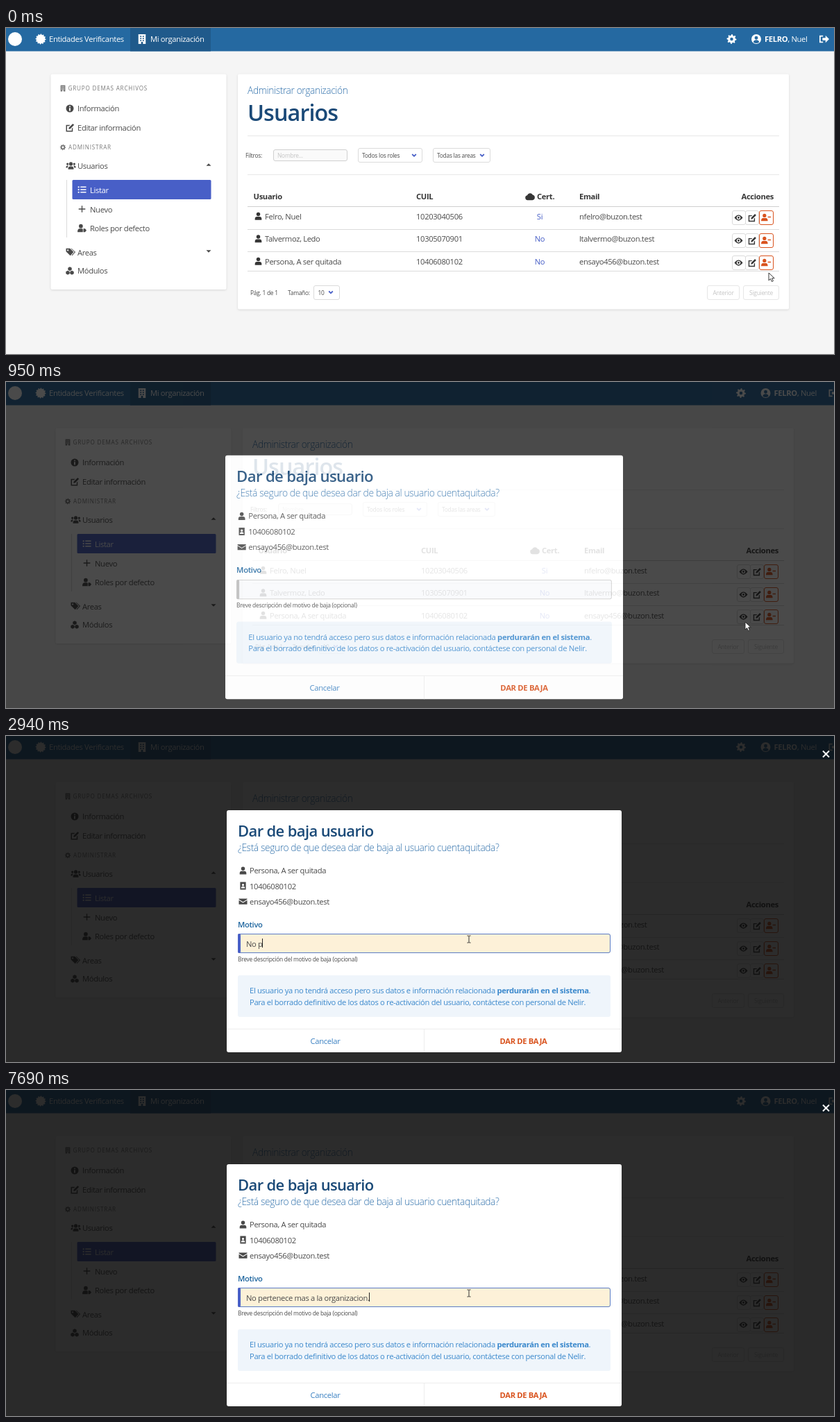
Animation, 1193 px wide and 470 px high, one loop 8000 ms. Source, as an HTML page:

```html
<!DOCTYPE html>
<html lang="es">
<head>
<meta charset="utf-8">
<title>Usuarios</title>
<style>
html, body { margin: 0; width: 100%; height: 100%; overflow: hidden; background: #f5f5f5; }
svg { display: block; width: 1193px; height: 470px; }
text { font: 11.2px "Open Sans", "Noto Sans", sans-serif; letter-spacing: -.029em; }
.small { font-size: 8.4px; }
.bold { font-weight: 700; }
.semi { font-weight: 600; }
.light { font-weight: 300; font-size: 13.8px; }
.label { font-size: 8.1px; letter-spacing: .1em; }
.mid { text-anchor: middle; }
.end { text-anchor: end; }
.card { filter: drop-shadow(0 1px 1.5px rgba(10,10,10,.12)); }
</style>
</head>
<body>
<svg id="stage" viewBox="0 0 1193 470"></svg>
<script>
const INK = '#4a4a4a', DARK = '#363636', BLUE = '#485fc7', NAVY = '#1b4a78', SKY = '#2f70ab', ORANGE = '#d9531e', PALE = '#c4c4c4';

// Icons live in a 16 x 16 box
const disc = (x, y, r) => `M${x - r} ${y}a${r} ${r} 0 1 0 ${2 * r} 0a${r} ${r} 0 1 0 ${-2 * r} 0z`;
const cog = (teeth, r) => 'M' + Array.from({ length: teeth * 4 }, (_, i) => {
  const a = i * Math.PI / teeth / 2, d = i % 4 < 2 ? 8 : r;
  return (8 + d * Math.cos(a)).toFixed(2) + ' ' + (8 + d * Math.sin(a)).toFixed(2);
}).join('L') + 'z';
const hex = (x, y) => `M${x} ${y - 4}l3.6 2v4l-3.6 2l-3.6-2v-4z`;
const icons = {
  user: disc(8, 4, 4) + 'M1 16v-2.5a4.5 4.5 0 0 1 4.5-4.5h5a4.5 4.5 0 0 1 4.5 4.5v2.5z',
  users: disc(8, 5, 3) + disc(2.5, 5.2, 1.9) + disc(13.5, 5.2, 1.9) + 'M3.5 14v-1.5q0-3.5 3.5-3.5h2q3.5 0 3.5 3.5v1.5zM0 11.5q-.5-3.5 2.5-3.5h1.5q-1.5 1.2-1.5 3.5zM16 11.5q.5-3.5-2.5-3.5h-1.5q1.5 1.2 1.5 3.5z',
  remove: disc(5.5, 5, 3) + 'M0 14q0-5 3.5-5h4q3.5 0 3.5 5zM11 6.5h5v1.7h-5z',
  role: disc(6, 4.5, 3.5) + 'M0 15q0-6 4-6h4q1 0 1.5 1v5zM10.5 9h3l2.5 3-2.5 3h-3z',
  account: disc(8, 8, 8) + disc(8, 6, 2.8) + 'M3.2 13q.8-3.5 4.8-3.5t4.8 3.5q-4.8 3.6-9.6 0z',
  building: 'M2 0h12v16h-4.5v-3.5h-3v3.5h-4.5z' + [2.5, 6, 9.5].map(y => `M5 ${y}v2h2v-2zM9 ${y}v2h2v-2z`).join(''),
  info: disc(8, 8, 8) + 'M6.8 3h2.4v2.3h-2.4zM6.5 7h2.8v6h-2.8z',
  edit: 'M0 3h8l-2 2h-4v9h9v-4l2-2v8h-13zM5 11l.5-3L13 .5l2.5 2.5L8 10.5z',
  gear: cog(8, 6) + disc(8, 8, 2.6),
  seal: cog(12, 6.6),
  list: [3, 8, 13].map(y => disc(1.5, y, 1.5) + `M5 ${y - 1}h11v2h-11z`).join(''),
  plus: 'M7 1h2v6h6v2h-6v6h-2v-6h-6v-2h6z',
  tags: 'M0 2h6.5l6 6-5.5 6-7-7zM8 2h1l6.5 6-5.5 6-.8-.8L14 8z' + disc(3, 5, 1.2),
  cubes: hex(8, 4.2) + hex(4, 11.5) + hex(12, 11.5),
  cloud: 'M4 14a4 4 0 0 1-.6-7.9a5 5 0 0 1 9-1.1a4.6 4.6 0 0 1-.4 9z',
  eye: 'M0 8q8-11 16 0q-8 11-16 0z' + disc(8, 8, 3.6) + disc(8, 8, 1.9),
  badge: 'M2 0h12v16h-12z' + disc(8, 6, 2.3) + 'M4 13q0-4 4-4t4 4z',
  mail: 'M0 2.5h16v1.5l-8 5-8-5zM0 5.5l8 5 8-5v8h-16z',
  exit: 'M0 2h6v2h-4v8h4v2h-6zM5 6h5v-4l6 6-6 6v-4h-5z',
  up: 'M0 12l8-8 8 8z',
  down: 'M0 4h16l-8 8z'
};

// Icon centred on x, y
const icon = (name, x, y, size = 12, fill = '') =>
  `<path d="${icons[name]}" fill-rule="evenodd" ${fill && `fill="${fill}"`} transform="translate(${x - size / 2} ${y - size / 2}) scale(${size / 16})"/>`;
const text = (x, y, str, cls = '', fill = '') =>
  `<text x="${x}" y="${y}" class="${cls}" ${fill && `fill="${fill}"`}>${str}</text>`;
const box = (x, y, w, h, fill, more = '') => `<rect x="${x}" y="${y}" width="${w}" height="${h}" fill="${fill}" ${more}/>`;
const frame = (x, y, w, h, stroke = '#dbdbdb', fill = '#fff') => box(x + .5, y + .5, w - 1, h - 1, fill, `stroke="${stroke}" rx="2.5"`);
const chevron = (x, y) => `<path d="M${x - 2.8} ${y - 1.5}l2.8 2.8 2.8-2.8" fill="none" stroke="${BLUE}" stroke-width="1.8"/>`;
const rule = (y, color) => box(348, y, 766, 1, color);

const person = 'Persona, A ser quitada', personId = '10406080102', personMail = 'ensayo456@buzon.test';

const header = box(0, 0, 1193, 33.5, '#2569a1') + box(179, 0, 116, 33.5, '#205a8b') +
  `<g fill="#fff"><circle cx="13" cy="16" r="10"/>` +
  icon('seal', 50, 16, 15) + text(62, 20, 'Entidades Verificantes') +
  icon('building', 196, 16, 14) + text(208, 20, 'Mi organización') +
  `<g id="account">` + icon('gear', 1045.5, 16, 14) + icon('account', 1081, 16, 14) +
  text(1093, 20, '<tspan class="bold">FELRO</tspan>, Nuel') + icon('exit', 1179, 16, 14) + '</g></g>';

const sidebar = box(64.5, 66.5, 253, 310.5, '#fff', 'class="card" rx="2"') +
  icon('building', 82, 87, 9, '#7a7a7a') + text(89.5, 90, 'GRUPO DEMAS ARCHIVOS', 'label', '#7a7a7a') +
  icon('info', 92, 116, 11) + text(103, 120, 'Información') +
  icon('edit', 92.5, 143.5) + text(103, 147.5, 'Editar información') +
  icon('gear', 82, 172, 8.5, '#7a7a7a') + text(90, 175, 'ADMINISTRAR', 'label', '#7a7a7a') +
  icon('users', 93.5, 198.5, 14) + text(103, 203, 'Usuarios') + icon('up', 292, 197, 7) +
  box(87, 219, 1, 83, '#dbdbdb') + box(95.5, 219, 200, 28, BLUE, 'rx="1.5"') +
  icon('list', 109.5, 233, 12, '#fff') + text(121, 237.5, 'Listar', '', '#fff') +
  icon('plus', 109.5, 261, 11) + text(121, 265.5, 'Nuevo') +
  icon('role', 109.5, 288.5, 13) + text(121, 292.5, 'Roles por defecto') +
  icon('tags', 93.5, 323, 14) + text(103, 327.5, 'Areas') + icon('down', 292, 322, 7) +
  icon('cubes', 92, 350) + text(103, 354, 'Módulos');

const row = ([name, id, cert, mail], i) => {
  const y = 273.3 + i * 32.5, base = y + 2.5, mid = Math.round(y), top = mid - 10;
  return icon('user', 363.5, y - 2, 11, DARK) + text(373, base, name) + text(591, base, id) +
    text(769, base, cert, 'mid', BLUE) + text(826, base, mail) +
    frame(1046, top, 20, 21) + frame(1065, top, 20, 21) + frame(1085, top, 21, 21, ORANGE) +
    icon('eye', 1055.5, mid + .5, 12, DARK) + icon('edit', 1075.5, mid + .5, 11.5, DARK) + icon('remove', 1095, mid, 14, ORANGE) +
    rule(i < 2 ? Math.round(y + 16.5) : 350, '#dbdbdb');
};
const main = box(334, 66.5, 794, 339, '#fff', 'class="card" rx="2"') +
  text(348, 95, 'Administrar organización', 'light', SKY) +
  `<text x="348" y="133.5" class="semi" style="font-size:32.4px" fill="${NAVY}">Usuarios</text>` +
  rule(155, '#e8e8e8') + rule(211, '#e8e8e8') +
  text(345, 187, 'Filtros:', 'small') +
  frame(385, 175, 107, 17, '#d0d0d0', '#fafafa') + text(391, 187, 'Nombre...', 'small', PALE) +
  frame(507, 173, 93, 21) + text(513, 187, 'Todos los roles', 'small') + chevron(588, 183.5) +
  frame(615, 173, 83, 21) + text(621, 187, 'Todas las areas', 'small') + chevron(686, 183.5) +
  `<g fill="${DARK}">` + text(356.5, 247, 'Usuario', 'bold') + text(591, 247, 'CUIL', 'bold') +
  icon('cloud', 755, 243, 14) + text(765, 247, 'Cert.', 'bold') + text(826, 247, 'Email', 'bold') +
  text(1106, 247, 'Acciones', 'bold end') + '</g>' + rule(257, '#cfcfcf') +
  [['Felro, Nuel', '10203040506', 'Si', 'nfelro@buzon.test'],
   ['Talvermoz, Ledo', '10305070901', 'No', 'ltalvermo@buzon.test'],
   [person, personId, 'No', personMail]].map(row).join('') +
  text(352, 384.5, 'Pág. 1 de 1', 'small') + text(406, 384.5, 'Tamaño:', 'small') +
  frame(443, 371, 38, 21) + text(449.5, 384.5, '10', 'small') + chevron(468, 381) +
  frame(1010, 371, 47, 21, '#e6e6e6') + text(1033.5, 384.5, 'Anterior', 'small mid', PALE) +
  frame(1062, 371, 52, 21, '#e6e6e6') + text(1088, 384.5, 'Siguiente', 'small mid', PALE);

const modal = box(318, 107, 569, 349, '#fff', 'rx="3"') +
  `<text x="334" y="145" class="semi" style="font-size:22px" fill="${NAVY}">Dar de baja usuario</text>` +
  text(334, 165.5, '¿Está seguro de que desea dar de baja al usuario cuentaquitada?', 'light', SKY) +
  icon('user', 341.5, 194, 11) + text(351, 198, person) +
  icon('badge', 341.5, 216, 11) + text(351, 220.5, personId) +
  icon('mail', 341.5, 238.5) + text(351, 242.5, personMail) +
  text(334, 275.5, 'Motivo', 'semi', '#1f669f') +
  frame(334, 285, 537, 28, '#cfcfcf', '#f9fafc') + box(334, 285, 4, 28, '#bdbdbd', 'rx="2"') +
  `<g id="focus">` + frame(334, 285, 537, 28, '#5a7cc4', '#fdf1d8') + box(334, 285, 4, 28, BLUE, 'rx="2"') + '</g>' +
  '<text id="typed" x="346" y="303.5"></text>' + box(0, 292, 1, 13, '#222', 'id="caret"') +
  text(334, 325, 'Breve descripción del motivo de baja (opcional)', 'small') +
  box(334, 345, 537, 60, '#eff5fb', 'rx="3"') + `<g fill="#3a88cc">` +
  text(351, 371, 'El usuario ya no tendrá acceso pero sus datos e información relacionada <tspan class="bold">perdurarán en el sistema</tspan>.') +
  text(351, 387.5, 'Para el borrado definitivo de los datos o re-activación del usuario, contáctese con personal de Nelir.') + '</g>' +
  box(318, 422, 569, 1, '#ededed') + box(602, 422, 1, 34, '#ededed') +
  text(460, 444, 'Cancelar', 'mid', '#3a80c2') + text(745.5, 444, 'DAR DE BAJA', 'bold mid', ORANGE);

const $ = id => document.getElementById(id);
$('stage').innerHTML = box(0, 0, 1193, 470, '#f5f5f5') + header +
  `<g id="page" fill="${INK}">${sidebar}${main}</g>
  <g id="overlay" fill="${INK}">${box(0, 0, 1193, 470, 'rgba(10,10,10,.86)')}<g id="modal">${modal}</g></g>
  <path id="close" d="M1177 21.5l9 9m0-9l-9 9" stroke="#fff" stroke-width="2"/>
  <g id="pointer"><path id="arrow" d="M0 0v11l2.6-2.4 1.8 4 2-.9-1.8-3.9h3.6z" fill="#fff" stroke="#222" stroke-width=".9"/>
  <path id="ibeam" d="M-2.5-5h2l.5.5.5-.5h2M-2.5 5h2l.5-.5.5.5h2M0-4.5v9" fill="none" stroke="#333"/></g>`;

// Pointer poses, each held until the next: time, x, y
const poses = [[0, 1099, 353], [120, 1099, 352], [190, 1099, 350], [260, 1098, 348], [330, 1098, 347], [400, 1097, 346],
  [810, 1097, 346], [880, 1097, 346], [950, 1065, 346], [1020, 983, 343], [1080, 870, 330],
  [1150, 760, 310], [1210, 690, 298], [1270, 667, 293]];

// Typing bursts: start, ms per key, keys ("<" deletes)
const bursts = [[2600, 0, 'N'], [2740, 100, 'o per'], [3340, 87, 'tene'], [3820, 85, 'ce mas a '], [4630, 100, 'la '],
  [5160, 80, 'orgfan'], [5700, 0, 'i'], [6020, 100, '<<<<a'], [6620, 100, 'nizac'], [7280, 65, 'ion'], [7690, 0, '.']];

const typedAt = t => {
  let str = '';
  for (const [start, gap, keys] of bursts)
    [...keys].forEach((key, i) => {
      if (t >= start + i * gap) str = key == '<' ? str.slice(0, -1) : str + key;
    });
  return str.replace(/ /g, '\u00a0');
};
const clamp = v => Math.max(0, Math.min(1, v));
const show = (id, on) => $(id).setAttribute('visibility', on ? 'visible' : 'hidden');

function draw(t) {
  const [step, x, y] = poses.filter(p => p[0] <= t).pop();
  const open = 1 - (1 - clamp((step - 844) / 150)) ** 1.6;
  const noScrollbar = step >= 810;
  $('account').setAttribute('transform', `translate(${noScrollbar ? 13.5 : 0})`);
  $('page').setAttribute('transform', `translate(${noScrollbar ? 7 : 0})`);
  $('overlay').setAttribute('opacity', open);
  $('modal').setAttribute('transform', `translate(602.5 281.5) scale(${1.05 - .05 * open}) translate(-602.5 -281.5)`);
  show('close', open == 1);

  const overField = open == 1 && x < 871 && y < 313;
  $('pointer').setAttribute('transform', `translate(${x} ${y})`);
  show('arrow', !overField);
  show('ibeam', overField);

  $('focus').setAttribute('opacity', clamp(Math.floor((t - 1600) / 70) / 3));
  $('typed').textContent = typedAt(t);
  $('caret').setAttribute('x', Math.round(345 + $('typed').getComputedTextLength()));
  show('caret', t >= 1670 && !(t >= 2200 && t < 2600));
}
const begin = performance.now();
(function tick() {
  draw((performance.now() - begin) % 8000);
  requestAnimationFrame(tick);
})();
</script>
</body>
</html>
```
